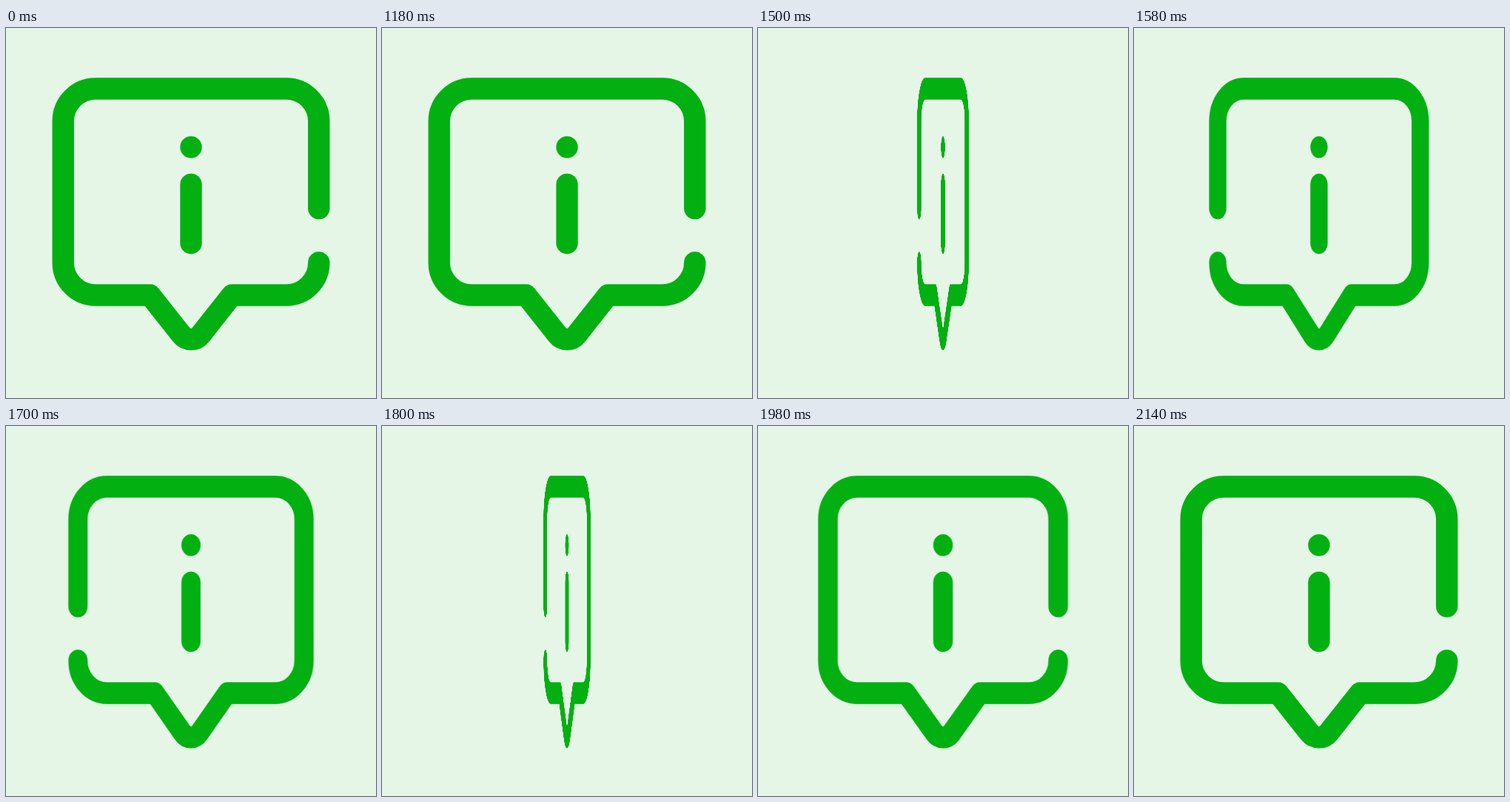
Recreate the animation shown at these times as an HTML page. Size 500 px wide and 500 px high, loop 3 s.

```html
<!DOCTYPE html>
<html lang="en">
<head>
<meta charset="utf-8">
<title>Info bubble</title>
<style>
  html, body {
    margin: 0;
    width: 100%;
    height: 100%;
    overflow: hidden;
    background: #e5f6e7;
  }

  .icon {
    display: block;
    width: 100%;
    height: 100%;
    fill: none;
    stroke: #02b011;
    stroke-width: 29.4;
    stroke-linecap: round;
    stroke-linejoin: round;
    animation: flip 3s infinite;
  }

  /* One full turn about the vertical axis, without perspective */
  @keyframes flip {
    0% { transform: rotateY(0deg); }
    38.6% {
      transform: rotateY(0deg);
      animation-timing-function: cubic-bezier(.3333, 0, .6667, 1);
    }
    71.4%, 100% { transform: rotateY(360deg); }
  }
</style>
</head>
<body>
<svg class="icon" viewBox="0 0 500 500">
  <path d="M422.8 243.8 V126 A44 44 0 0 0 378.8 82 H121.2 A44 44 0 0 0 77.2 126
           V317 A44 44 0 0 0 121.2 361 H194.7 L237 414.5 A16.6 16.6 0 0 0 263 414.5
           L305.3 361 H378.8 A44 44 0 0 0 422.8 317"/>
  <path d="M250 161 h.01 M250 211.5 V290.7"/>
</svg>
</body>
</html>
```
